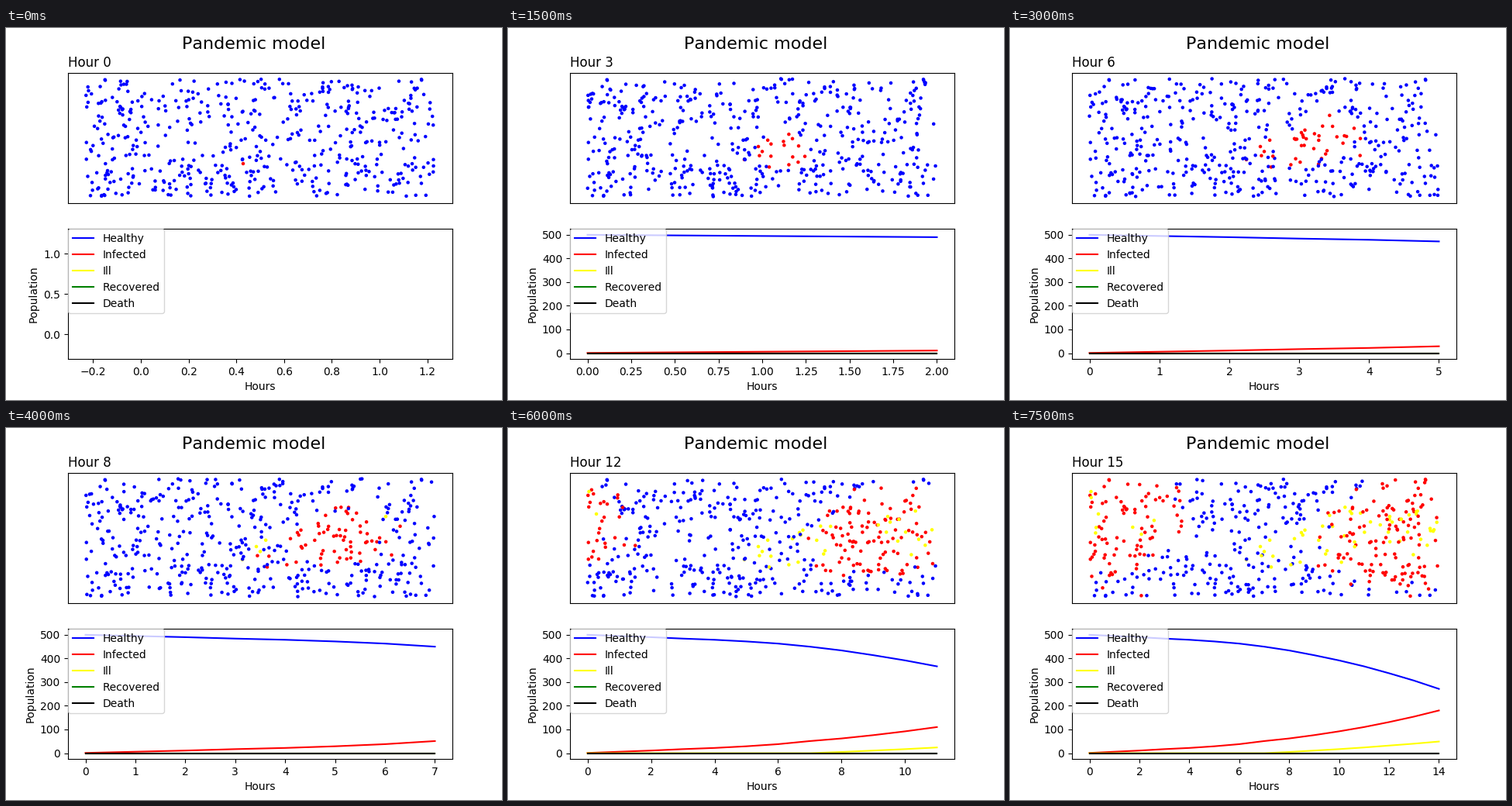
Recreate the animation shown at these times as a matplotlib script. Size 640 by 480 pixels, loop 8 s.

```python
import numpy as np
import matplotlib.pyplot as plt
from matplotlib.animation import FuncAnimation

HOURS = 16
N = 500
FIELD = np.array([102.5, 65.2])   # dot field in stage pixels
SIZE = np.array([451, 152.4])
SEED = np.array([306, 175])       # first infected person
COLORS = np.array(["blue", "red", "yellow"])

# Steady spread at first, then a quadratic rise; illness follows later
t = np.arange(HOURS)
late = np.maximum(t - 7, 0)
cases = np.rint(1 + 5.2 * t + 1.55 * np.maximum(t - 4, 0) ** 2).astype(int)
ill = np.rint(4.6 * late + 0.35 * late ** 2).astype(int)
none = np.zeros(HOURS, int)
SERIES = [("Healthy", "blue", N - cases), ("Infected", "red", cases - ill),
          ("Ill", "yellow", ill), ("Recovered", "green", none),
          ("Death", "black", none)]


def exposure(pos, hour):
    """Distance from the outbreak, in radii of its growing, drifting ellipse."""
    cx = SEED[0] + 15.5 * hour
    cy = 126 + 49 * np.exp(-hour / 6)
    dx = (pos[:, 0] - cx + SIZE[0] / 2) % SIZE[0] - SIZE[0] / 2
    dy = pos[:, 1] - cy + 0.12 * dx
    return np.hypot(dx / (5 + 9 * hour), dy / (10 + 4.6 * hour))


def simulate():
    rng = np.random.default_rng(12)
    pos = FIELD + rng.random((N, 2)) * SIZE
    step = rng.normal((23, -4), 3, (N, 2))
    step[rng.random(N) < 0.5] = 0   # half of the people stay at home
    pos[0], step[0] = SEED, (23, -7.6)

    state = np.zeros(N, int)
    caught = np.zeros(N)
    state[0] = 1
    history = []
    for hour in range(HOURS):
        if hour:
            pos = pos + step * (state < 2)[:, None]
            pos = FIELD + (pos - FIELD) % SIZE

        cost = exposure(pos, hour) + rng.normal(0, 0.1, N)
        cost[state > 0] = np.inf
        new = np.argsort(cost)[:cases[hour] - np.sum(state > 0)]
        state[new] = 1
        caught[new] = hour + rng.normal(0, 0.6, len(new))

        since = np.where(state == 1, caught, np.inf)
        state[np.argsort(since)[:ill[hour] - np.sum(state == 2)]] = 2
        history.append((pos, state.copy()))
    return history


history = simulate()

plt.rcParams["text.kerning_factor"] = 6
fig, (field, chart) = plt.subplots(2, 1, figsize=(6.4, 4.8), dpi=100)
fig.suptitle("Pandemic model", fontsize=16, y=0.978)

field.set(xlim=(80, 576), ylim=(225.6, 57.6), xticks=[], yticks=[])
dots = field.scatter(*history[0][0].T, s=10.5, linewidths=0)
title = field.set_title("Hour 0", loc="left", pad=5.4)

lines = [chart.plot([], [], color=c, label=name)[0] for name, c, _ in SERIES]
chart.legend(loc="upper left", borderaxespad=0)
chart.set(xlabel="Hours", ylabel="Population")


def draw(hour):
    pos, state = history[hour]
    dots.set_offsets(pos)
    dots.set_facecolor(COLORS[state])
    title.set_text(f"Hour {hour}")
    for line, (_, _, counts) in zip(lines, SERIES):
        line.set_data(t[:hour], counts[:hour])

    if hour == 0:
        chart.set(xlim=(-0.305, 1.305), ylim=(-0.307, 1.307))
    else:
        last = hour - 1
        pad = 0.05 * last or 0.055
        chart.set(xlim=(-pad, last + pad), ylim=(-24.95, 523.95))
    return [dots, title, *lines]


anim = FuncAnimation(fig, draw, frames=HOURS, interval=500,
                     init_func=lambda: draw(0), repeat=True, repeat_delay=0)
plt.show()
```
